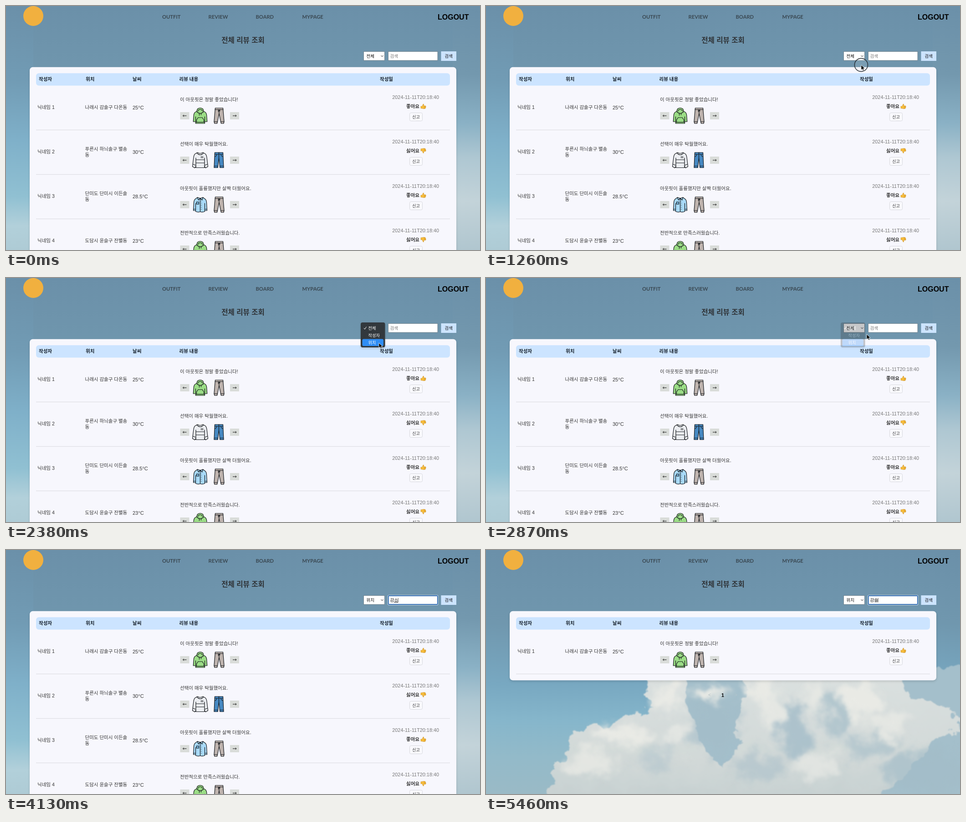
Recreate the animation shown at these times as an HTML page. Size 1041 by 538 pixels, loop 5.81 s.

```html
<!DOCTYPE html>
<html lang="ko">
<head>
<meta charset="utf-8">
<title>전체 리뷰 조회</title>
<style>
  html, body { margin: 0; width: 100%; height: 100%; overflow: hidden; background: #7299af; }
  svg { display: block; width: 1041px; height: 538px; }
  text { font-family: "Liberation Sans", "Noto Sans CJK KR", "Noto Sans CJK", sans-serif; font-size: 10.5px; fill: #333; white-space: pre; }
  .nav text { font: 700 11.2px Lato, sans-serif; fill: #3a4852; }
  .head text { font-weight: 700; fill: #16202a; }
  .title { font-size: 15.6px; font-weight: 700; fill: #2f3337; }
  .field text { font-size: 9.5px; fill: #111; }
  .field .hint { fill: #757575; }
  .popup text { font-size: 9.2px; fill: #fff; }
  .temp { font-size: 11px; }
  .date { font-size: 10.85px; fill: #777; }
  .vote { font-weight: 700; }
  .small { font-size: 9.2px; }
  .mid { text-anchor: middle; }
  .ink { stroke: #15181c; stroke-width: 1.2; stroke-linejoin: round; stroke-linecap: round; }
  .line { fill: none; }
  .bright { fill: #e9eae5; }
  .dim { fill: #a3bcc8; }

  .timed { animation: 5810ms step-end infinite; }
  .many { animation-name: many; }
  .one { animation-name: one; opacity: 0; }
  .before { animation-name: before; }
  .after { animation-name: after; opacity: 0; }
  .focus { animation-name: focus; opacity: 0; }
  .empty { animation-name: empty; }
  .k1 { animation-name: k1; opacity: 0; }
  .k2 { animation-name: k2; opacity: 0; }
  .k3 { animation-name: k3; opacity: 0; }
  .k4 { animation-name: k4; opacity: 0; }
  .k5 { animation-name: k5; opacity: 0; }
  .press { animation-name: press; opacity: 0; }
  .beam { animation-name: beam; opacity: 0; }
  .arrow { animation-name: arrow; opacity: 0; }
  .popup { animation: popup 5810ms linear infinite; opacity: 0; }
  .path { animation: path 5810ms linear infinite; }

  @keyframes many { 0% { opacity: 1 } 73.48%, 100% { opacity: 0 } }
  @keyframes one { 0% { opacity: 0 } 73.48%, 100% { opacity: 1 } }
  @keyframes before { 0% { opacity: 1 } 51.79%, 100% { opacity: 0 } }
  @keyframes after { 0% { opacity: 0 } 51.79%, 100% { opacity: 1 } }
  @keyframes focus { 0% { opacity: 0 } 55.41%, 100% { opacity: 1 } }
  @keyframes empty { 0% { opacity: 1 } 66.25%, 100% { opacity: 0 } }
  @keyframes k1 { 0% { opacity: 0 } 66.25% { opacity: 1 } 68.66%, 100% { opacity: 0 } }
  @keyframes k2 { 0% { opacity: 0 } 68.66% { opacity: 1 } 69.86%, 100% { opacity: 0 } }
  @keyframes k3 { 0% { opacity: 0 } 69.86% { opacity: 1 } 71.07%, 100% { opacity: 0 } }
  @keyframes k4 { 0% { opacity: 0 } 71.07% { opacity: 1 } 72.28%, 100% { opacity: 0 } }
  @keyframes k5 { 0% { opacity: 0 } 72.28%, 100% { opacity: 1 } }
  @keyframes press { 0% { opacity: 0 } 14.45% { opacity: 1 } 33.72%, 100% { opacity: 0 } }
  @keyframes beam { 0% { opacity: 0 } 51.79% { opacity: 1 } 60.23%, 100% { opacity: 0 } }
  @keyframes arrow { 0% { opacity: 0 } 4.81% { opacity: 1 } 51.79%, 100% { opacity: 0 } }
  @keyframes popup {
    0%, 33.71% { opacity: 0 }
    33.72%, 47.5% { opacity: 1 }
    49.4% { opacity: .28 }
    50.6%, 100% { opacity: 0 }
  }
  @keyframes path {
    0%, 4.81% { transform: translate(880px, 250px) }
    9.64%, 13.25% { transform: translate(822.5px, 103.5px) }
    14.45%, 19.2% { transform: translate(819.5px, 112px) }
    24.1% { transform: translate(828px, 147px) }
    28.9% { transform: translate(821px, 135px) }
    31.32% { transform: translate(819.5px, 129px) }
    36% { transform: translate(815px, 143px) }
    45% { transform: translate(822px, 143px) }
    48.2% { transform: translate(828px, 136px) }
    49.4% { transform: translate(836px, 124px) }
    51.8%, 100% { transform: translate(848px, 116px) }
  }
</style>
</head>
<body>
<svg viewBox="0 0 1041 538">
  <defs>
    <linearGradient id="sky" x2="0" y2="1">
      <stop stop-color="#6b90a9"/><stop offset=".3" stop-color="#7097ae"/>
      <stop offset=".55" stop-color="#78a8c1"/><stop offset=".7" stop-color="#86b6cb"/>
      <stop offset=".85" stop-color="#93bac9"/><stop offset="1" stop-color="#9abac6"/>
    </linearGradient>
    <linearGradient id="west" x2="0" y2="1">
      <stop stop-color="#6b90a9"/><stop offset=".3" stop-color="#719bb4"/>
      <stop offset=".55" stop-color="#7fb0c9"/><stop offset=".78" stop-color="#90c0d2"/>
      <stop offset=".9" stop-color="#b2d0da"/><stop offset="1" stop-color="#aecbd5"/>
    </linearGradient>
    <linearGradient id="east" x2="0" y2="1">
      <stop stop-color="#6b90a9"/><stop offset=".28" stop-color="#7398ae"/>
      <stop offset=".48" stop-color="#8ab1c5"/><stop offset=".62" stop-color="#aec7d2"/>
      <stop offset=".8" stop-color="#c3d3d9"/><stop offset="1" stop-color="#b0c6cf"/>
    </linearGradient>
    <linearGradient id="puff" x2="0" y2="1">
      <stop stop-color="#dbe1e0"/><stop offset=".6" stop-color="#d2d9d8"/><stop offset="1" stop-color="#c3cecf"/>
    </linearGradient>
    <filter id="fluff" x="-10%" y="-10%" width="120%" height="120%">
      <feTurbulence type="fractalNoise" baseFrequency=".025" numOctaves="5" seed="7"/>
      <feDisplacementMap in="SourceGraphic" scale="46" xChannelSelector="R" yChannelSelector="G"/>
      <feGaussianBlur stdDeviation="1"/>
    </filter>
    <filter id="billow" x="-10%" y="-20%" width="120%" height="140%" color-interpolation-filters="sRGB">
      <feGaussianBlur in="SourceGraphic" stdDeviation="9" result="haze"/>
      <feTurbulence type="fractalNoise" baseFrequency=".02" numOctaves="4" seed="3"/>
      <feDisplacementMap in="haze" scale="70" xChannelSelector="R" yChannelSelector="G"/>
      <feGaussianBlur stdDeviation="1.5"/>
    </filter>
    <filter id="shade" x="-5%" y="-10%" width="110%" height="120%">
      <feDropShadow dx="0" dy="2.500" stdDeviation="2.700" flood-color="#000" flood-opacity=".14"/>
    </filter>

    <g id="hoodie" class="ink">
      <path fill="#9bdd86" d="M8 8.500Q2.400 10 1.800 17L.8 31H6V35H26V31H31.200L30.200 17Q29.600 10 24 8.500L22 3Q16-1.500 10 3Z"/>
      <path class="line" d="M6 31V20M26 31V20M8 8.500Q16 17 24 8.500M11 8Q12 4 16 4T21 8M14 13V17M18 13V16M6 32.300H26"/>
      <path class="line" d="M11.500 22H20.500L24 27V32M11.500 22L8 27V32"/>
    </g>
    <g id="pants" class="ink">
      <path fill="#bfb4af" d="M3.500 1H20.500L21.500 13 23 31 22 35H16.500L15.500 31 12 13 8.500 31 7.500 35H2L1 31 2.500 13Z"/>
      <path class="line" d="M3 4.500H21M12 5V13M10.500 4.500V9M13.500 4.500V8M1.200 31H8.500M15.500 31H22.800"/>
    </g>
    <g id="sweater" class="ink">
      <path fill="#eceef2" d="M12 1Q17 5 23 1L28 3.500Q31 5 32 12L34.500 32 29.500 35 27 32V34.500H8V32L5.500 35 .5 32 3 12Q4 5 7 3.500Z"/>
      <path class="line" d="M8 32V13M27 32V13M10 2Q17.500 10 25 2M8 17H27M8 24H27M19 10H24M19 12.500H24M2 27L7 29M33 27L28 29"/>
    </g>
    <g id="jeans" class="ink">
      <path fill="#4789c2" d="M2.500 1H20.500L22 34.500H13.800L11.500 13 9.200 34.500H1Z"/>
      <path class="line" d="M2.300 5H20.700M11.500 1V13M2.500 10Q6 10 7 5M20.500 10Q17 10 16 5M1.200 31H9.500M13.500 31H21.800"/>
    </g>
    <g id="shirt" class="ink">
      <path fill="#a9daf8" d="M10 2L16 4 22 2 26 5Q29.500 7 30 13L31 31H26V33Q21 35.500 16 33.500 11 35.500 6 33V31H1L2 13Q2.500 7 6 5Z"/>
      <path class="line" d="M6 31V15M26 31V15M10 2L12 8 16 4 20 8 22 2M16 5V33M1 28H6M26 28H31"/>
      <path fill="#79b9e2" d="M8 12H13V17H8Z"/>
      <path class="line" stroke-dasharray=".1 4" d="M18.500 12V30"/>
    </g>
    <g id="thumb" stroke="#b97917" stroke-width=".5" stroke-linejoin="round">
      <path fill="#f7bd3b" d="M.5 5.500H3.500L5.500.8Q7.500.2 7.300 2.500L6.800 4.500H10.500Q12 4.800 11.500 6.100 12.200 7 11.200 7.900 11.600 9 10.600 9.500 10.700 11 9 11H5L3.500 10.200H.5Z"/>
      <path fill="none" d="M7.800 6.200H11.300M7.800 8H11M7.800 9.600H10.500"/>
    </g>
  </defs>

  <rect width="1041" height="538" fill="url(#sky)"/>

  <g class="timed one">
    <g filter="url(#fluff)">
      <path fill="#a4bfcb" d="M420 260H1080V580H420Z"/>
      <path fill="url(#puff)" d="M348 260H425L445 340 470 420 520 480 560 430 552 380 566 330 562 260H905L925 320 960 335 1030 350 1045 400 990 420 960 470 900 500 860 580H135L150 510 150 462 175 440 195 402 240 384 280 388 310 362 370 358 350 320Z"/>
    </g>
    <g filter="url(#billow)">
      <g class="dim">
        <ellipse cx="500" cy="375" rx="48" ry="75" opacity=".6"/>
        <ellipse cx="680" cy="400" rx="30" ry="60" opacity=".8"/>
        <ellipse cx="765" cy="370" rx="22" ry="55" opacity=".7"/>
        <ellipse cx="600" cy="480" rx="60" ry="28" opacity=".5"/>
        <ellipse cx="840" cy="430" rx="55" ry="24" opacity=".6"/>
        <ellipse cx="970" cy="485" rx="90" ry="45" opacity=".7"/>
        <ellipse cx="370" cy="460" rx="45" ry="18" opacity=".4"/>
      </g>
      <g class="bright">
        <ellipse cx="490" cy="317" rx="36" ry="17"/>
        <ellipse cx="402" cy="325" rx="32" ry="28"/>
        <ellipse cx="300" cy="405" rx="65" ry="20"/>
        <ellipse cx="235" cy="470" rx="55" ry="26" opacity=".8"/>
        <ellipse cx="420" cy="415" rx="30" ry="24" opacity=".7"/>
        <ellipse cx="600" cy="315" rx="28" ry="28"/>
        <ellipse cx="640" cy="350" rx="22" ry="38" opacity=".8"/>
        <ellipse cx="720" cy="320" rx="24" ry="28" opacity=".8"/>
        <ellipse cx="825" cy="335" rx="40" ry="42"/>
        <ellipse cx="890" cy="385" rx="42" ry="22" opacity=".8"/>
        <ellipse cx="725" cy="475" rx="50" ry="25" opacity=".7"/>
      </g>
    </g>
    <rect x="52" y="134.700" width="937" height="152.500" rx="7" fill="#f7f7fd" filter="url(#shade)"/>
    <g class="mid">
      <text x="491" y="323" style="fill:#b3bfc4">&lt;</text>
      <text x="520" y="323.500" style="fill:#000;font-weight:700">1</text>
      <text x="549" y="323" style="fill:#b3c4cb">&gt;</text>
    </g>
  </g>

  <g class="timed many">
    <rect width="60" height="538" fill="url(#west)"/>
    <rect x="981" width="60" height="538" fill="url(#east)"/>
    <rect x="52" y="134.700" width="937" height="440" rx="7" fill="#f7f7fd" filter="url(#shade)"/>
    <g id="rest"></g>
  </g>
  <g id="first"></g>

  <circle cx="60" cy="22" r="22" fill="#f1b03f"/>
  <g class="nav">
    <text x="343" y="27.500">OUTFIT</text><text x="444.500" y="27.500">REVIEW</text>
    <text x="548.500" y="27.500">BOARD</text><text x="650.500" y="27.500">MYPAGE</text>
  </g>
  <text x="948" y="29.500" style="font-size:16px;font-weight:700;fill:#000">LOGOUT</text>
  <text class="title mid" x="520.500" y="81.300">전체 리뷰 조회</text>

  <rect x="66" y="148.300" width="909" height="27.200" rx="6" fill="#cce4ff"/>
  <g class="head">
    <text x="72" y="165">작성자</text><text x="175" y="165">위치</text><text x="278" y="165">날씨</text>
    <text x="380.500" y="165">리뷰 내용</text><text x="821" y="165">작성일</text>
  </g>

  <g class="field">
    <rect x="785.500" y="100.500" width="46" height="19.500" fill="#fff" stroke="#6b7880" stroke-width=".8"/>
    <text class="timed before" x="791.500" y="113.500">전체</text>
    <text class="timed after" x="791.500" y="113.500">위치</text>
    <path d="M823.500 109L826 111.700 828.500 109" fill="none" stroke="#222"/>
    <rect x="839.500" y="100.500" width="108.500" height="19.500" fill="#fff" stroke="#6b7880" stroke-width=".8"/>
    <g class="timed focus">
      <rect x="838.300" y="99.500" width="111" height="22" rx="2" fill="#fff"/>
      <rect x="839.800" y="100.900" width="108" height="19" rx="1" fill="#fff" stroke="#1f60ad" stroke-width="1.700"/>
    </g>
    <g class="timed empty">
      <text class="hint" x="843.500" y="113.500">검색</text>
      <path class="timed focus" d="M844 105.500V115.500" stroke="#111" stroke-width=".8"/>
    </g>
    <g id="typing"></g>
    <rect x="955.500" y="100" width="33.500" height="21" fill="#cce4ff"/>
    <text class="mid" x="972.300" y="113.500">검색</text>
  </g>

  <g class="popup">
    <rect x="779" y="98" width="53.500" height="55" rx="4" fill="#33393d" filter="url(#shade)"/>
    <rect x="782.500" y="134.500" width="46.500" height="15.500" rx="3" fill="#2f8df5"/>
    <path d="M786 110.500L788 113 791.500 107.500" fill="none" stroke="#fff"/>
    <text x="795.500" y="113.500">전체</text><text x="795.500" y="129.800">작성자</text><text x="795.500" y="145.500">위치</text>
  </g>

  <g class="timed beam"><path d="M851.500 106Q854 106 854 108V116Q854 118 851.500 118M856.500 106Q854 106 854 108M854 116Q854 118 856.500 118" fill="none" stroke="#111"/></g>
  <g class="timed arrow"><g class="path">
    <circle class="timed press" r="14.500" fill="#fff" fill-opacity=".08" stroke="#20262b" stroke-width="1.400"/>
    <path d="M0 0V11.300L2.600 8.900 4.500 13 6.400 12.200 4.600 8.100H8.200Z" fill="#000" stroke="#fff" stroke-width=".8"/>
  </g></g>
</svg>
<script>
  const reviews = [
    { place: ["나래시 감솔구 다온동"], temp: "25", note: "이 아웃핏은 정말 좋았습니다!", top: "hoodie", good: true },
    { place: ["푸른시 하늬솔구 별송", "동"], temp: "30", note: "선택이 매우 탁월했어요.", top: "sweater" },
    { place: ["단미도 단미시 이든솔", "동"], temp: "28.5", note: "아웃핏이 훌륭했지만 살짝 더웠어요.", top: "shirt", good: true },
    { place: ["도담시 윤슬구 잔별동"], temp: "23", note: "전반적으로 만족스러웠습니다.", top: "hoodie" },
  ];
  const text = (x, y, s, cls = "") => `<text x="${x}" y="${y}" class="${cls}">${s}</text>`;
  const icon = (id, x, y) => `<use href="#${id}" transform="translate(${x} ${y})"/>`;
  const stepper = (x, dir) => `<rect x="${x}" y="234" width="20" height="16" fill="#d9dcd9"/>
    <g transform="translate(${x + 10} 242) scale(${dir} 1)">
      <path d="M-4 0H4M1.800-2L4 0 1.800 2" fill="none" stroke="#111"/></g>`;

  function row(r, i) {
    const wrap = r.place.length > 1;
    const place = r.place.map((s, n) => text(173.5, (wrap ? 220.6 : 227.3) + n * 13.3, s)).join("");
    const bottom = r.top === "sweater" ? "jeans" : "pants";
    const thumb = `<use href="#thumb" transform="translate(910.5 ${r.good ? 215.5 : 227}) scale(1 ${r.good ? 1 : -1})"/>`;
    return `<g transform="translate(0 ${i * 98})">
      ${text(69, 227.3, "닉네임 " + (i + 1))}${place}${text(278, 228, r.temp + "°C", "temp")}
      ${text(382, 210, r.note)}${stepper(382.5, -1)}${stepper(492, 1)}
      ${icon(r.top, r.top === "sweater" ? 409 : 410.5, 224)}${icon(bottom, 456, 224)}
      ${text(848.3, 204.5, "2024-11-11T20:18:40", "date")}
      ${text(879, 225, r.good ? "좋아요" : "싫어요", "vote")}${thumb}
      <rect x="886.5" y="235.5" width="28" height="18" rx="3" fill="#f9f9fd" stroke="#d8d9de"/>
      ${text(900.5, 247.5, "신고", "small mid")}
      <path d="M66 273.300H975" stroke="#d9d9de"/></g>`;
  }

  // Each step: composed text, and whether the last syllable is still open.
  const steps = [["ㄱ", 1], ["가", 1], ["감", 1], ["감소", 1], ["감솔", 0]];
  const keyed = ([s, open], n) => {
    const w = 8.74, end = 843.5 + s.length * w;
    const rule = open ? `<path d="M${end - w} 115.500H${end}" stroke="#111" stroke-width=".9"/>` : "";
    return `<g class="timed k${n + 1}">${text(843.5, 113.5, s)}${rule}
      <path d="M${end} 105.500V115.500" stroke="#111" stroke-width=".8"/></g>`;
  };

  const fill = (id, html) => document.getElementById(id).innerHTML = html;
  fill("first", row(reviews[0], 0));
  fill("rest", reviews.slice(1).map((r, i) => row(r, i + 1)).join(""));
  fill("typing", steps.map(keyed).join(""));
</script>
</body>
</html>
```
